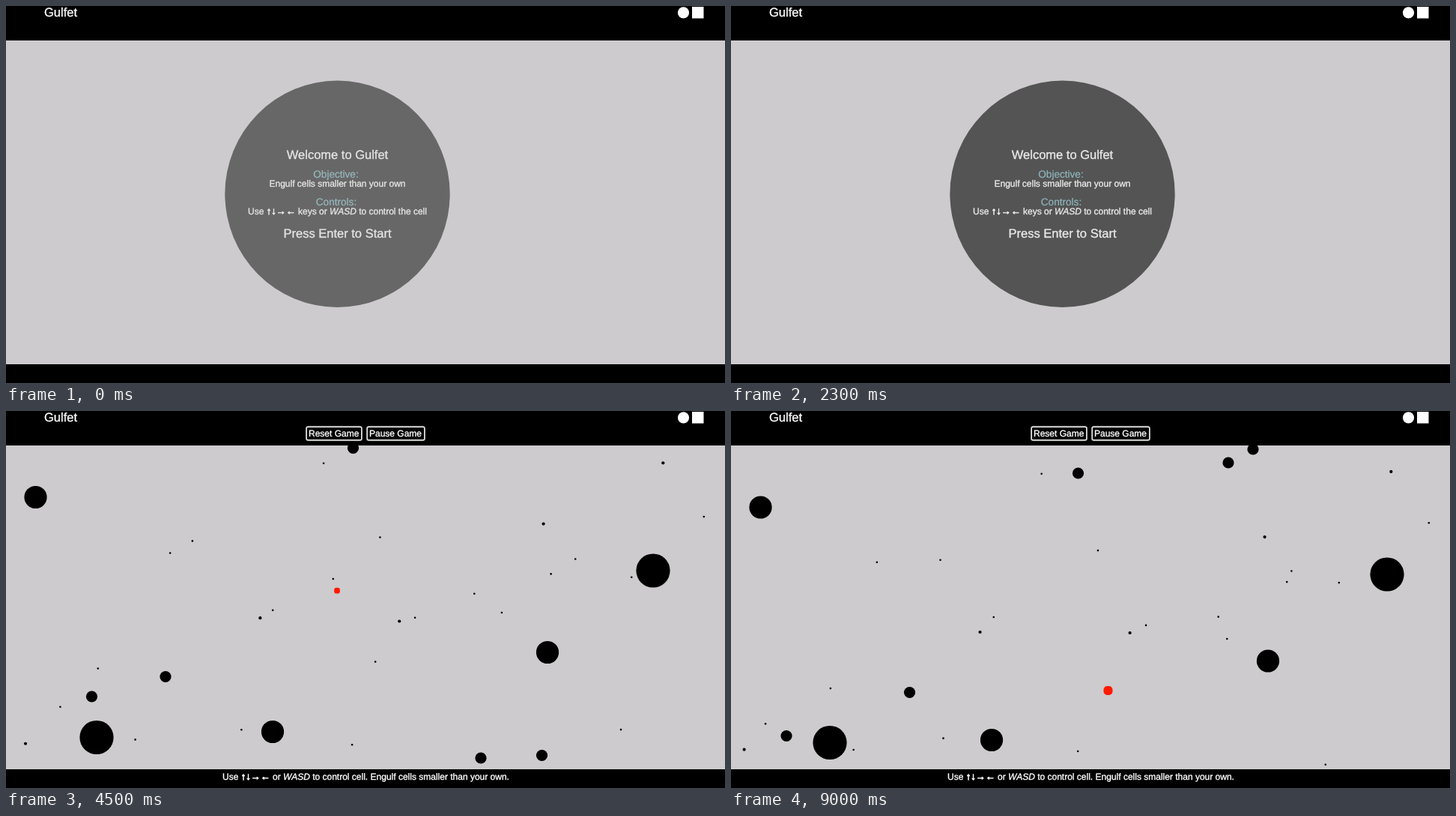
An HTML page for the animation above (9.1 s loop, 960 by 503 pixels).

```html
<!DOCTYPE html>
<html lang="en">
<head>
<meta charset="utf-8">
<title>Gulfet</title>
<style>
  html, body { margin: 0; width: 100%; height: 100%; overflow: hidden; background: #000; }
  svg { display: block; width: 100vw; height: 100vh; }
  text {
    font: 12px "Liberation Sans", Arial, sans-serif;
    fill: #fff; stroke: #fff; stroke-width: .35;
    white-space: pre; text-rendering: geometricPrecision;
  }
  .large { font-size: 16.5px; }
  .label { font-size: 13.6px; fill: #62a8ae; stroke: #62a8ae; stroke-width: .2; }
  .arrows { font-size: 13px; stroke-width: .8; }
  .keys { font-style: italic; }
  .mid { text-anchor: middle; }
  .button { fill: #000; stroke: #eee; stroke-width: 1.4; }
  .glow { fill: none; stroke: #777; stroke-width: 1; }
</style>
</head>
<body>
<svg viewBox="0 0 960 503" preserveAspectRatio="none">
  <rect y="46" width="960" height="432" fill="#cdcbcd"/>

  <g id="welcome">
    <ellipse cx="442.5" cy="250.8" rx="150.2" ry="151.2"/>
    <text class="large mid" x="442.5" y="203.5">Welcome to Gulfet</text>
    <text class="label mid" x="440.5" y="229">Objective:</text>
    <text class="mid" x="442.5" y="241">Engulf cells smaller than your own</text>
    <text class="label mid" x="441" y="266">Controls:</text>
    <text x="323" y="278">Use <tspan class="arrows">↑↓→←</tspan> keys or <tspan class="keys">WASD</tspan> to control the cell</text>
    <text class="large mid" x="442.5" y="308.5">Press Enter to Start</text>
  </g>

  <g id="field">
    <g id="cells"></g>
    <rect id="player" fill="#ff1a00"/>
  </g>

  <rect width="960" height="46"/>
  <rect y="478" width="960" height="25"/>
  <text class="large" x="51" y="14.3">Gulfet</text>
  <circle cx="904.5" cy="8.8" r="7.6" fill="#fff"/>
  <rect x="916" y="1" width="15.5" height="15.5" fill="#fff"/>

  <g id="hud">
    <rect class="glow" x="400.3" y="20.3" width="75.4" height="19.4" rx="3"/>
    <rect class="button" x="401.3" y="21.3" width="73.4" height="17.4" rx="2"/>
    <text x="404" y="34">Reset Game</text>
    <rect class="glow" x="481.3" y="20.3" width="78.4" height="19.4" rx="3"/>
    <rect class="button" x="482.3" y="21.3" width="76.4" height="17.4" rx="2"/>
    <text x="485" y="34">Pause Game</text>
    <text x="289" y="492">Use <tspan class="arrows">↑↓→←</tspan> or <tspan class="keys">WASD</tspan> to control cell. Engulf cells smaller than your own.</text>
  </g>
</svg>

<script>
const LOOP = 9100, STEP = 100, GAME_START = 2800;
const FIELD = { left: 26, right: 932, top: 46, height: 432 };
const MEALS = [6400, 8700];
const BASE = 4500, SPAN = 4500; // cells are placed at BASE and drift over SPAN

const $ = id => document.getElementById(id);
const setAttrs = (el, attrs) => {
  for (const name in attrs) el.setAttribute(name, attrs[name]);
};
const show = (el, on) => { el.style.display = on ? "" : "none"; };
const lerp = (a, b, p) => a + (b - a) * p;
const clamp = p => Math.max(0, Math.min(1, p));

let seed = 7;
function random() {
  seed = (seed * 16807) % 2147483647;
  return seed / 2147483647;
}

const cells = [];
function addCell(r, x, y, dx, dy, eaten = Infinity) {
  const el = document.createElementNS("http://www.w3.org/2000/svg", "circle");
  el.setAttribute("r", r);
  $("cells").append(el);
  cells.push({ el, x, y, dx, dy, eaten });
}

function scatter(count, r, spread, fall) {
  for (let i = 0; i < count; i++) {
    const x = lerp(FIELD.left, FIELD.right, (i + random()) / count);
    const y = FIELD.top + random() * FIELD.height;
    const dx = (random() * 2 - 1) * spread * clamp((FIELD.right - x) / 100);
    addCell(r, x, y, dx, lerp(7, fall, random() ** 2));
  }
}

function playerAt(t) {
  const path = [[2800, 442, 262], [4500, 442, 239.7], [6200, 433, 223.5], [9000, 503.5, 373]];
  const next = Math.max(1, path.findIndex(([time]) => time >= t));
  const [t0, x0, y0] = path[next - 1], [t1, x1, y1] = path[next];
  const p = (t - t0) / (t1 - t0);
  return { x: lerp(x0, x1, p), y: lerp(y0, y1, p) };
}

// Food lies where the player arrives at each meal.
function addFood(time) {
  const { x, y } = playerAt(time);
  const dx = 3, dy = 24, p = (time - BASE) / SPAN;
  addCell(1.3, x - dx * p, y - dy * p, dx, dy, time);
}

addCell(22.6, 864, 213, 12, 5);
addCell(22.6, 121, 435.5, 11, 7);
addCell(15.1, 39.5, 115, 0, 13.5);
addCell(15.1, 723, 322, -6, 11.5);
addCell(15.1, 356, 428, -8, 11);
addCell(7.6, 463.5, 49.5, 0, 33.5);
addCell(7.6, 213, 354.5, 25.5, 21);
addCell(7.6, 114.5, 381, -40.5, 52.5);
addCell(7.6, 634, 463, 63, 20);
addCell(7.6, 715.5, 459.5, -51.5, 41.5);
scatter(5, 2.1, 20, 28);
scatter(18, 1.3, 35, 66);
MEALS.forEach(addFood);

function wrapY(y) {
  const { top, height } = FIELD;
  return top + ((y - top) % height + height) % height;
}

function drawCells(t) {
  const p = (t - BASE) / SPAN;
  for (const c of cells) {
    show(c.el, t < c.eaten);
    setAttrs(c.el, { cx: c.x + c.dx * p, cy: wrapY(c.y + c.dy * p) });
  }
}

function drawPlayer(t) {
  const { x, y } = playerAt(t);
  const r = 3.9 + 1.05 * MEALS.filter(time => t >= time).length;
  setAttrs($("player"), { x: x - r, y: y - r, width: 2 * r, height: 2 * r, rx: r * .8 });
}

function welcomeOpacity(t) {
  if (t < 500) return lerp(.49, 1, t / 500);
  return 1 - clamp((t - 1710) / 1000) ** 1.67;
}

function draw(t) {
  const playing = t >= GAME_START;
  show($("welcome"), !playing);
  show($("field"), playing);
  show($("hud"), playing);
  if (playing) {
    drawCells(t);
    drawPlayer(t);
  } else {
    $("welcome").style.opacity = welcomeOpacity(t);
  }
}

const started = performance.now();
function tick() {
  const t = (performance.now() - started) % LOOP;
  draw(Math.floor(t / STEP) * STEP);
  requestAnimationFrame(tick);
}
tick();
</script>
</body>
</html>
```
